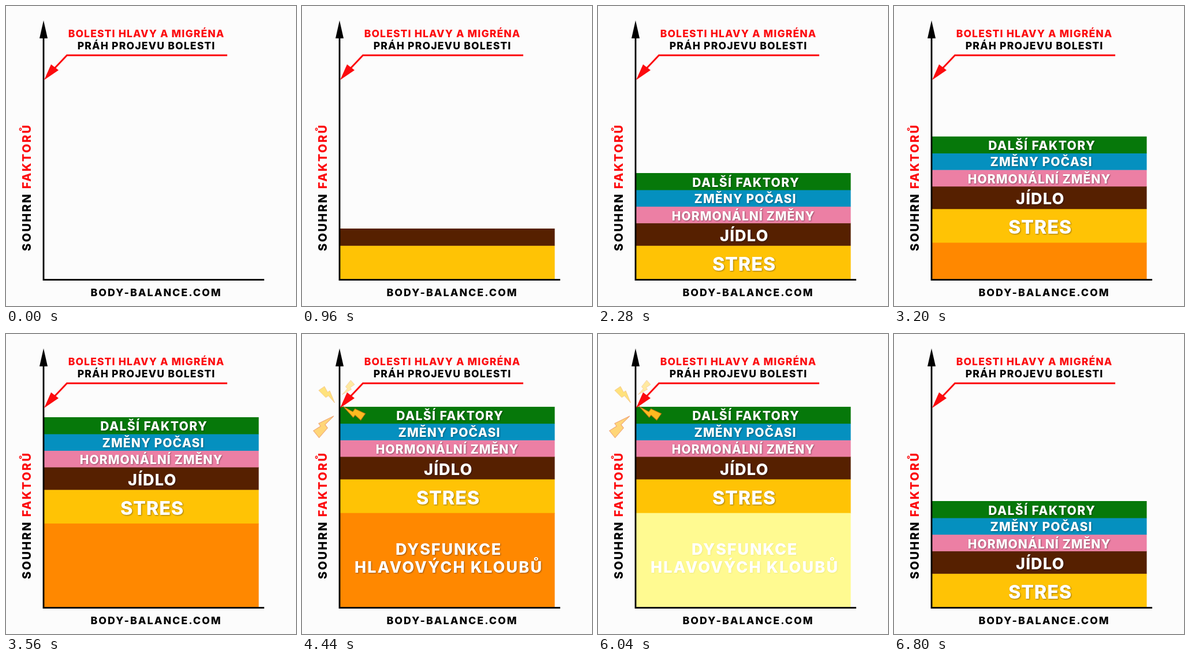
An HTML page for the animation above (9080 ms loop, 502 by 519 pixels).

```html
<!DOCTYPE html>
<html lang="cs">
<head>
<meta charset="utf-8">
<style>
  html, body { margin: 0; width: 100%; height: 100%; overflow: hidden; background: #fcfcfc; }
  svg { display: block; width: 100vw; height: 100vh; }
  text { font-family: Inter, "Open Sans", sans-serif; font-weight: 800; text-anchor: middle; }
  .label { fill: #fff; }
  #bars .label { filter: drop-shadow(1px 1px 1px rgba(0, 0, 0, .4)); }
  .red { fill: #fc0a0e; }
</style>
</head>
<body>
<svg viewBox="0 0 502 519">
  <defs>
    <clipPath id="reveal"><rect id="window" x="66" width="371.500" height="500"/></clipPath>
    <clipPath id="floor"><rect width="502" height="473"/></clipPath>
  </defs>
  <g clip-path="url(#floor)">
    <g id="stack">
      <g id="bars" clip-path="url(#reveal)"></g>
      <rect id="base" x="66" y="473" width="371.500" height="165"/>
    </g>
  </g>
  <g id="baseText"></g>

  <path d="M65 50V473.700H447" fill="none" stroke="#000" stroke-width="2.800"/>
  <path d="M65 25L72 56H58Z"/>
  <g id="bolts"></g>
  <path d="M383 85.200H105.500L82 110" fill="none" stroke="#fc0a0e" stroke-width="3"/>
  <path d="M66 128L78 101L91 111Z" class="red"/>
  <g id="titles"></g>
</svg>
<script>
const LOOP = 9080, STEP = 40, RISE = 163.3;
const $ = id => document.getElementById(id);

function add(parent, tag, attrs, content) {
  const el = document.createElementNS('http://www.w3.org/2000/svg', tag);
  for (const k in attrs) el.setAttribute(k, attrs[k]);
  if (content) el.innerHTML = content;
  parent.append(el);
  return el;
}

// The trailing letter gap is balanced by shifting the centre half a gap.
function write(parent, content, x, y, size, gap, attrs) {
  return add(parent, 'text', { x: x + gap / 2, y, 'font-size': size, 'letter-spacing': gap, ...attrs }, content);
}

const label = { class: 'label' };
const titles = $('titles');
write(titles, 'BOLESTI HLAVY A MIGRÉNA', 242.5, 53.5, 17.5, 1.15, { class: 'red' });
write(titles, 'PRÁH PROJEVU BOLESTI', 242.5, 75, 17.5, 1.2);
write(titles, 'BODY-BALANCE.COM', 259, 501.5, 17.8, 2.05);
write(titles, 'SOUHRN <tspan class="red">FAKTORŮ</tspan>', 0, 0, 20, 2.35,
  { transform: 'translate(42.500 315) rotate(-90)' });

// name, colour, top, height, baseline, size, gap, centre
const layers = [
  ['STRES', '#ffc305', 414.3, 59, 458, 32.5, .8, 252.7],
  ['JÍDLO', '#562000', 375.3, 39, 407, 27, 1.2, 252.7],
  ['HORMONÁLNÍ ZMĚNY', '#ec7fa4', 346.7, 28.6, 370.5, 21, 1, 251],
  ['ZMĚNY POČASI', '#0590bf', 318, 28.7, 341, 21, 1.1, 254.5],
  ['DALŠÍ FAKTORY', '#06780a', 289, 29, 312.5, 21, 1.4, 255.5]
];
const names = layers.map(([name, fill, y, height, base, size, gap, x]) => {
  add($('bars'), 'rect', { x: 66, y, width: 372, height: height + .5, fill });
  return [name, x, base, size, gap];
}).map(args => write($('bars'), ...args, label));

write($('baseText'), 'DYSFUNKCE', 253.2, 382, 27, 1.8, label);
write($('baseText'), 'HLAVOVÝCH KLOUBŮ', 253, 413, 27, 2.15, label);

// Every bolt points towards the threshold: x, y, angle, scale, fill, outline
const bolts = [
  [89, 135, 115, 1.25, '#ffba20', '#a86a10'],
  [45, 106, -45, 1.08, '#ffe27c', '#f3c58c'],
  [79, 94, 38, .9, '#ffe9a0', '#f3c9a0'],
  [39, 158, -139, 1.4, '#ffd678', '#f0a878']
].map(([x, y, angle, k, fill, stroke]) => add($('bolts'), 'path', {
  d: 'M-5-16L6-14L3-4L7-3L-1 16L0 1L-5 0Z', fill, stroke, 'stroke-width': .8,
  transform: `translate(${x} ${y}) rotate(${angle}) scale(${k})`
}));

function track(t, keys) {
  if (t <= keys[0][0]) return keys[0][1];
  for (let i = 1; i < keys.length; i++) {
    const [t0, a] = keys[i - 1], [t1, b] = keys[i];
    if (t <= t1) return a + (b - a) * (t - t0) / (t1 - t0);
  }
  return keys[keys.length - 1][1];
}

function draw(time) {
  const t = Math.floor(time % LOOP / STEP) * STEP;
  $('window').setAttribute('y', track(t, [[200, 473], [1789, 289]]));
  names.forEach((el, i) => {
    const start = 1240 + i * 208;
    el.style.opacity = track(t, [[start, 0], [start + 208, 1]]);
  });

  const lift = track(t, [[2920, 0], [3640, RISE], [6080, RISE], [6800, 0]]);
  $('stack').setAttribute('transform', `translate(0 ${-lift})`);

  const pale = track(t, [[4800, 0], [6040, 1]]);
  $('base').setAttribute('fill', `rgb(255 ${136 + 114 * pale} ${145 * pale})`);
  $('base').style.opacity = track(t, [[6040, 1], [6320, 0]]);
  $('baseText').style.opacity = track(t, [[3600, 0], [3880, 1], [6040, 1], [6160, 0]]);
  $('baseText').style.filter = `drop-shadow(1px 1px 1px rgba(0, 0, 0, ${.4 - .34 * pale}))`;
  bolts.forEach((el, i) => {
    const start = 3760 + i * 160;
    el.style.opacity = track(t, [[start, 0], [start + 200, 1], [6040, 1], [6360, 0]]);
  });
}

const begin = performance.now();
function tick() {
  draw(performance.now() - begin);
  requestAnimationFrame(tick);
}
tick();
</script>
</body>
</html>
```
